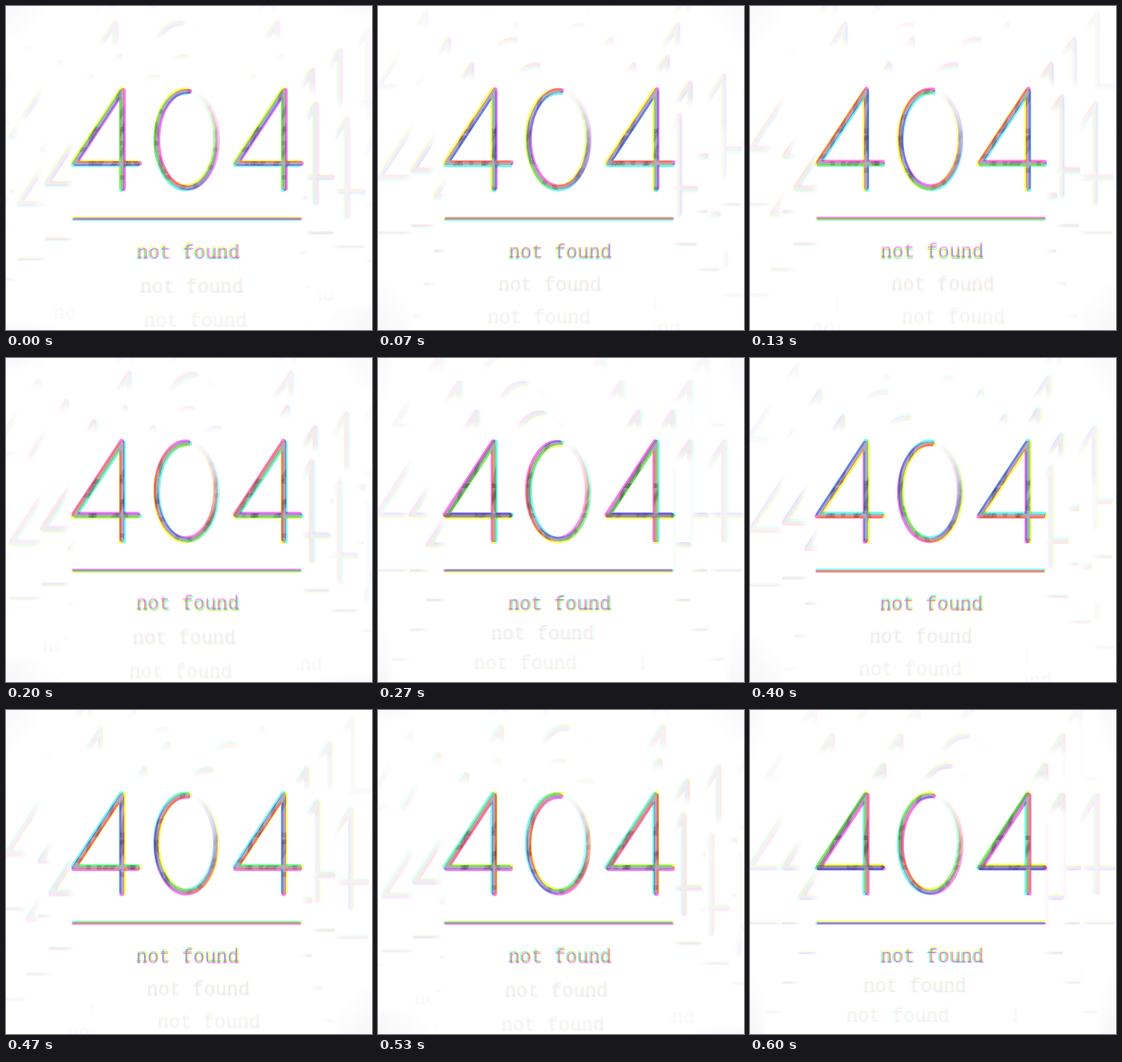
Write an HTML page with a canvas that moves like this. It is 480 by 426 pixels and loops after 0.67 s.

```html
<!DOCTYPE html>
<html lang="en">
<head>
<meta charset="utf-8">
<title>404 not found</title>
<style>
html, body { margin: 0; width: 100%; height: 100%; overflow: hidden; background: #fff; }
canvas { display: block; width: 480px; height: 426px; }
</style>
</head>
<body>
<canvas id="stage" width="480" height="426" role="img" aria-label="404 not found"></canvas>
<script>
const W = 480, H = 426, LOOP = 670, STEPS = 10;
const TURN = Math.PI * 2;
const INKS = ['255,122,244', '120,248,244', '255,250,95'];
const GRAY = '178,170,184';
const DARK = '75,55,90';
const FEET = { n: [3.5, 11.5], f: [7.5], u: [12], d: [12] };

// Steps are a fifteenth of a second, rounded to hundredths
const startOf = i => Math.round(i * 20 / 3) * 10;

function layer() {
  const c = document.createElement('canvas');
  c.width = W;
  c.height = H;
  return c.getContext('2d');
}

function four(g, x) {
  g.beginPath();
  g.moveTo(x + 21, 207);
  g.lineTo(x - 63, 207);
  g.lineTo(x, 111);
  g.lineTo(x, 240);
  g.stroke();
}

function zero(g, rgb) {
  const cx = 236.5, cy = 175.5;
  const fade = g.createConicGradient(-1.4, cx, cy);
  [[0, 0], [.06, .12], [.22, .5], [.48, 1], [1, 1]].forEach(([at, a]) =>
    fade.addColorStop(at, `rgba(${rgb},${a})`));
  g.strokeStyle = fade;
  g.beginPath();
  g.ellipse(cx, cy, 39.2, 63.5, 0, -1.5, -1.22, true);
  g.stroke();
}

function digits(g, rgb) {
  g.lineWidth = 6;
  g.lineCap = g.lineJoin = 'round';
  g.strokeStyle = `rgb(${rgb})`;
  four(g, 152.3);
  four(g, 364.6);
  zero(g, rgb);
}

function caption(g, rgb) {
  const text = 'not found', left = 171, base = 331.6;
  g.fillStyle = `rgba(${rgb},.9)`;
  g.fillRect(87, 278.3, 300, 3);
  g.fillStyle = `rgba(${rgb},.72)`;
  g.font = '25px "Liberation Mono", "Courier New", monospace';
  g.fillText(text, left, base);
  [...text].forEach((ch, i) => (FEET[ch] || []).forEach(x =>
    g.fillRect(left + i * 15 + x - 2.5, base - 2, 5, 2)));
}

// Three inks around a turning circle, gray where all of them overlap
function split(draw, radius, angle) {
  const out = layer(), core = layer();
  INKS.forEach((ink, i) => {
    const a = angle + i * TURN / 3;
    const plate = layer();
    plate.translate(radius * Math.cos(a), radius * Math.sin(a));
    draw(plate, ink);
    out.globalCompositeOperation = 'multiply';
    out.drawImage(plate.canvas, 0, 0);
    core.globalCompositeOperation = i ? 'destination-in' : 'source-over';
    core.drawImage(plate.canvas, 0, 0);
  });
  core.globalCompositeOperation = 'source-in';
  core.fillStyle = `rgb(${GRAY})`;
  core.fillRect(0, 0, W, H);
  out.globalCompositeOperation = 'source-over';
  out.drawImage(core.canvas, 0, 0);
  return out.canvas;
}

const shape = layer();
digits(shape, DARK);

// Soft white card behind every copy of the title
const card = layer();
card.filter = 'blur(5px)';
card.fillStyle = '#fff';
card.fillRect(84, 92, 308, 248);

function backdrop(g) {
  const glow = g.createRadialGradient(240, 205, 270, 240, 205, 330);
  glow.addColorStop(0, '#fff');
  glow.addColorStop(1, '#f6f6f6');
  g.fillStyle = glow;
  g.fillRect(0, 0, W, H);
}

// Six spokes of echoes on one ring, the lowest in front
function ring(radius, angle) {
  return Array.from({ length: 6 }, (_, k) => {
    const a = angle + k * TURN / 6;
    return [radius * Math.cos(a), radius * Math.sin(a)];
  }).sort((a, b) => a[1] - b[1]);
}

function render(step) {
  const angle = -step * TURN / STEPS;
  const spokes = angle - TURN / STEPS;
  const title = layer();
  title.filter = 'blur(.7px)';
  title.drawImage(split(digits, 1.9, angle), 0, 0);
  title.drawImage(split(caption, 1.3, angle), 0, 0);

  const g = layer();
  const copy = (dx, dy, alpha) => {
    g.globalAlpha = 1;
    g.drawImage(card.canvas, dx, dy);
    g.globalAlpha = alpha;
    g.drawImage(title.canvas, dx, dy);
  };
  backdrop(g);
  for (let n = 3; n > 0; n--) {
    ring(45 * n, spokes).forEach(([dx, dy]) => copy(dx, dy, .26 - .06 * n));
  }
  copy(0, 0, 1);

  // Darker patches where the nearest echoes cross the digits
  const cross = layer();
  cross.globalAlpha = .22;
  ring(45, spokes).forEach(([dx, dy]) => cross.drawImage(shape.canvas, dx, dy));
  cross.globalAlpha = 1;
  cross.globalCompositeOperation = 'destination-in';
  cross.drawImage(shape.canvas, 0, 0);
  g.globalCompositeOperation = 'multiply';
  g.globalAlpha = 1;
  g.drawImage(cross.canvas, 0, 0);
  return g.canvas;
}

const starts = Array.from({ length: STEPS }, (_, i) => startOf(i));
const pictures = starts.map((_, i) => render(i));
const stage = document.getElementById('stage').getContext('2d');
let shown = -1;

function play() {
  const t = performance.now() % LOOP;
  const step = starts.filter(s => s <= t).length - 1;
  if (step !== shown) {
    stage.drawImage(pictures[step], 0, 0);
    shown = step;
  }
  requestAnimationFrame(play);
}
play();
</script>
</body>
</html>
```
